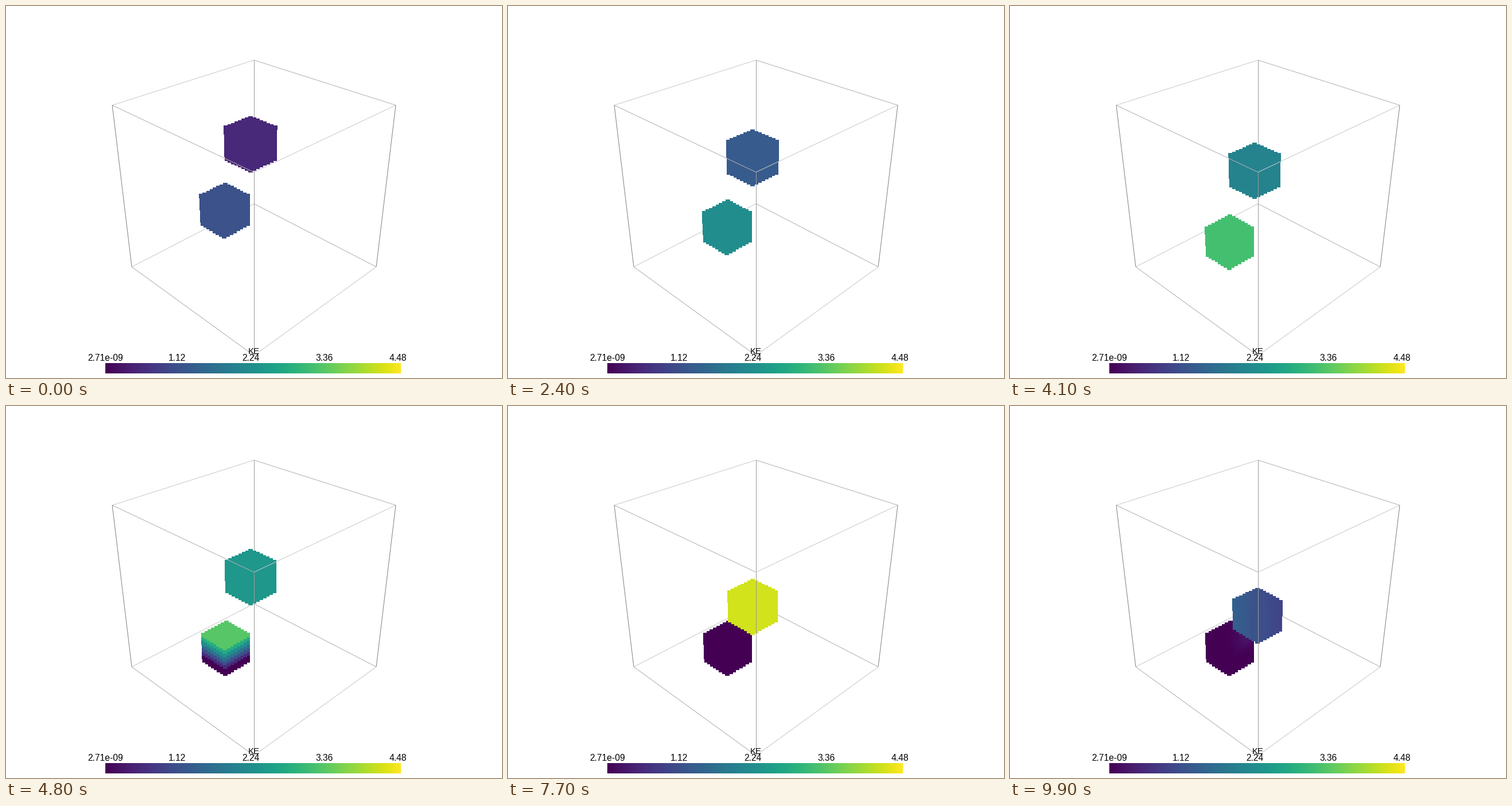
These frames come from a looping animation (864x648 px, 10 s). A matplotlib script:

```python
import itertools

import matplotlib.pyplot as plt
import numpy as np
from matplotlib.animation import FuncAnimation

W, H, FRAMES = 864, 648, 100
FOCAL, DIST, PITCH = 1094, 3.383, np.radians(30)
STEP, SIDE = 0.025, 8
G = 9.81 * 0.0025**2          # gravity per frame squared
KE_MAX = 4.48
DEPTH0 = -0.025 / np.sqrt(2)  # both blocks sit slightly towards the camera
VIRIDIS = plt.get_cmap("viridis")

plt.rcParams["font.family"] = "Liberation Sans"
fig = plt.figure(figsize=(W / 72, H / 72), dpi=72, facecolor="white")
ax = fig.add_axes([0, 0, 1, 1])
ax.axis("off")


def project(lat, far, z):
    """Screen position and depth; coordinates are relative to the box centre."""
    c, s = np.cos(PITCH), np.sin(PITCH)
    depth = DIST + far * c - z * s
    return (W / 2 + FOCAL * lat / depth,
            H / 2 - FOCAL * (z * c + far * s) / depth, depth)


# Wireframe box
R = np.sqrt(0.5)
CORNERS = {"B": (0, R), "L": (-R, 0), "R": (R, 0), "F": (0, -R)}


def edge(p, q, color, zorder):
    pts = [project(*CORNERS[name], z)[:2] for name, z in (p, q)]
    ax.plot(*zip(*pts), color=color, lw=1, zorder=zorder,
            solid_capstyle="butt")


for z in (-0.5, 0.5):
    for a, b, color in (("B", "L", "0.79"), ("B", "R", "0.69"),
                        ("L", "F", "0.69"), ("F", "R", "0.79")):
        edge((a, z), (b, z), color, 1 if a == "B" else 3)
for name, color in (("B", "0.6"), ("L", "0.5"), ("R", "0.5"), ("F", "0.6")):
    edge((name, -0.5), (name, 0.5), color, 1 if name == "B" else 3)

# Scalar bar
ax.imshow(np.linspace(0, 1, 256)[None], cmap=VIRIDIS, aspect="auto",
          extent=(173, 688, 640, 622), interpolation="nearest", zorder=4)
for x, label in ((173, "2.71e-09"), (298, "1.12"), (426, "2.24"),
                 (555, "3.36"), (683, "4.48")):
    ax.text(x, 617.5, label, size=15.6, ha="center", zorder=5)
ax.text(432, 605.5, "KE", size=15, ha="center", zorder=5)
ax.set(xlim=(0, W), ylim=(H, 0))

# Block of points, layer by layer
idx = np.array(list(itertools.product(range(SIDE), repeat=3)))
gx, gy, gz = ((idx - (SIDE - 1) / 2) * STEP).T
LAYER = idx[:, 2]
LAT, FAR = (gx - gy) / np.sqrt(2), (gx + gy) / np.sqrt(2)


def fall(n, z0, v0):
    return z0 - v0 * n - G * n * n / 2


def speed(n, v0):
    return v0 + 9.81 * 0.0025 * n


def lower_block(n):
    z = max(fall(n, -0.104, 0.0038), -0.354)
    ke = min(speed(n, 1.5)**2 / 2, 3.3) * np.ones(len(LAYER))
    if n >= 44:
        front = 1 + 2.2 * (n - 48)
        ke *= np.clip((LAYER - front) / 6, 0, 1)
    if n > 81:
        d2 = (LAT - 0.1)**2 + (gz - 0.0875)**2
        ke += 0.22 * np.exp(-d2 / 0.004)
    return LAT - 0.225 / np.sqrt(2), FAR + DEPTH0, gz + z, ke


def upper_block(n):
    hit, turn = 81, 91.5
    z = fall(min(n, hit), 0.2965, 0.00254)
    lat, dz = LAT - STEP / np.sqrt(2), 0
    if n <= hit:
        ke = np.full(len(LAYER), speed(n, 1)**2 / 2)
    else:
        k, stop = n - hit, turn - hit
        brake = 0.00752 / stop
        down = min(k, stop)
        up = max(k - stop, 0)
        z += -0.00752 * down + brake * down**2 / 2 + 4.98e-4 * up**2 / 2
        v = (-0.00752 + brake * down + 4.98e-4 * up) / 0.0025
        ke = (v - 1.2 * LAT)**2 / 2
        if n < turn:
            d2 = (LAT + 0.1)**2 + (gz + 0.0875)**2
            ke *= 1 - 0.65 * np.exp(-d2 / 0.005)
        dz = -0.0019 * k * LAT
        lat = lat + 0.001 * max(n - 84, 0)
    return lat, FAR + DEPTH0, gz + z + dz, ke


dots = ax.scatter([], [], s=64, marker="s", linewidths=0, zorder=2)
dots.set_antialiased(False)
dots.set_snap(False)


def draw(n):
    lat, far, z, ke = np.hstack([lower_block(n), upper_block(n)])
    x, y, depth = project(lat, far, z)
    order = np.argsort(-depth)
    dots.set_offsets(np.round(np.c_[x, y])[order])
    dots.set_facecolor(VIRIDIS(np.clip(ke / KE_MAX, 0, 1))[order])
    return (dots,)


anim = FuncAnimation(fig, draw, frames=FRAMES, interval=100,
                     init_func=lambda: draw(0), repeat=True, repeat_delay=0)
plt.show()
```
